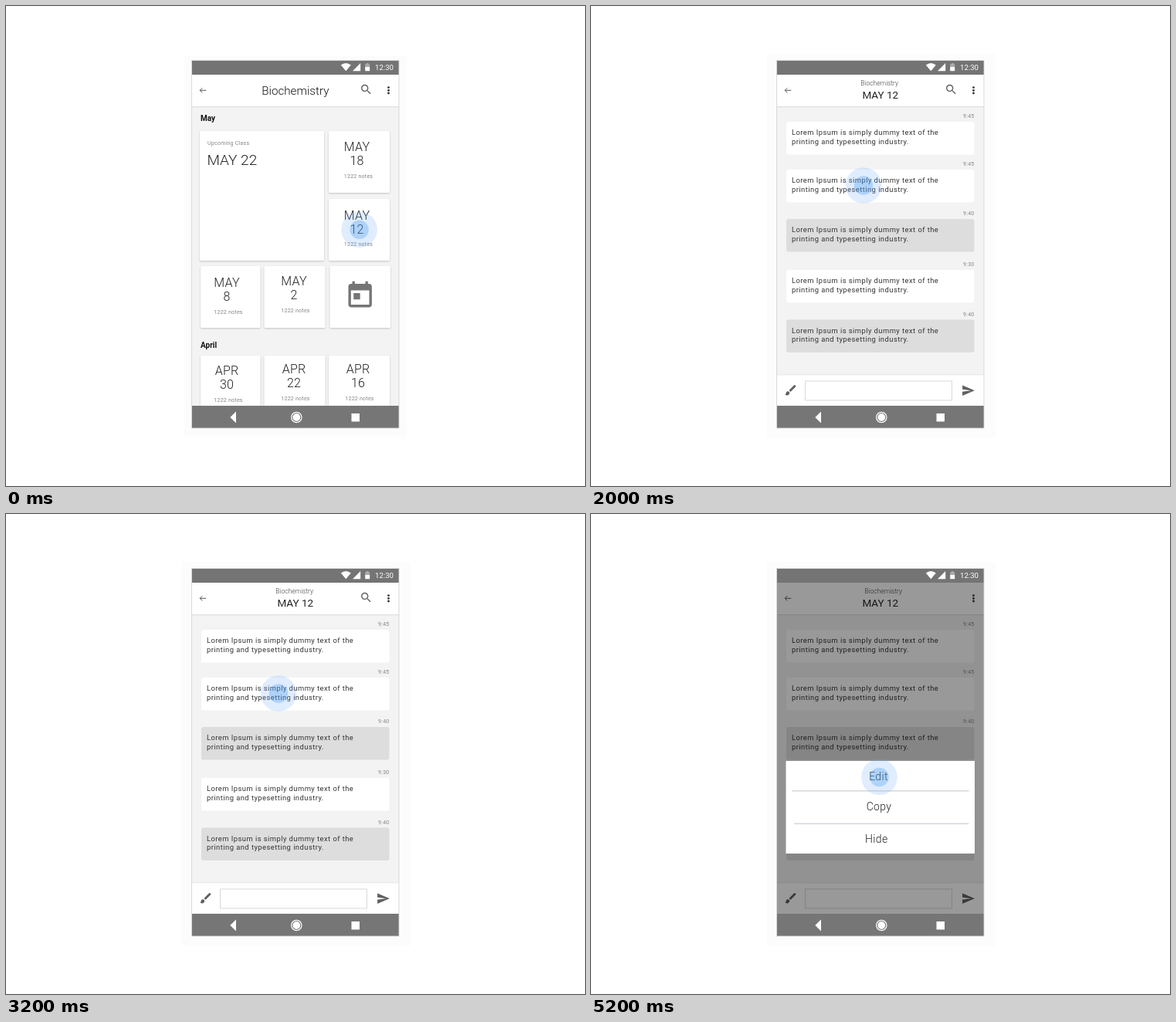
Animation of 750 by 622 pixels, one loop 6 s. Source, as an HTML page:

```html
<!DOCTYPE html>
<html lang="en">
<head>
<meta charset="utf-8">
<title>Class notes prototype</title>
<style>
  html, body { margin: 0; width: 100%; height: 100%; overflow: hidden; background: #fff; }
  svg { display: block; width: 750px; height: 622px; font-family: Roboto, sans-serif; }
  .mid { text-anchor: middle; }
  .end { text-anchor: end; }
  .light { font-weight: 300; }
  .note { font-size: 7px; letter-spacing: .25px; fill: #858585; }
  .date { font-size: 16px; letter-spacing: .15px; font-weight: 300; fill: #222; }
  .head { font-size: 10px; font-weight: 700; fill: #111; }
  .msg { font-size: 9.4px; letter-spacing: .46px; fill: #333; }
  .item { font-size: 14px; letter-spacing: .35px; font-weight: 300; fill: #222; }
  .card { filter: drop-shadow(0 1px 1px rgba(0, 0, 0, .2)); }
</style>
</head>
<body>
<svg id="stage" viewBox="0 0 750 622"></svg>
<script>
const LOOP = 6000, STEP = 2000;

const ICON = {
  search: 'M15.5 14h-.79l-.28-.27C15.41 12.59 16 11.11 16 9.5 16 5.91 13.09 3 9.5 3S3 5.91 3 9.5 5.91 16 9.5 16c1.61 0 3.09-.59 4.23-1.57l.27.28v.79l5 4.99L20.49 19l-4.99-5zm-6 0C7.01 14 5 11.99 5 9.5S7.01 5 9.5 5 14 7.01 14 9.5 11.99 14 9.5 14z',
  today: 'M19 3h-1V1h-2v2H8V1H6v2H5c-1.1 0-2 .9-2 2v14c0 1.1.9 2 2 2h14c1.1 0 2-.9 2-2V5c0-1.1-.9-2-2-2zm0 16H5V8h14v11zM7 10h5v5H7z',
  brush: 'M7 14c-1.66 0-3 1.34-3 3 0 1.31-1.16 2-2 2 .92 1.22 2.49 2 4 2 2.21 0 4-1.79 4-4 0-1.66-1.34-3-3-3zm13.71-9.37l-1.34-1.34c-.39-.39-1.02-.39-1.41 0L9 12.25 11.75 15l8.96-8.96c.39-.39.39-1.02 0-1.41z',
  send: 'M2 21L23 12 2 3v7l15 2-15 2z'
};

const rect = (x, y, w, h, fill, more = '') =>
  `<rect x="${x}" y="${y}" width="${w}" height="${h}" fill="${fill}" ${more}/>`;
const text = (x, y, s, cls, more = '') =>
  `<text x="${x}" y="${y}" class="${cls}" ${more}>${s}</text>`;
const circle = (x, y, r, fill, more = '') =>
  `<circle cx="${x}" cy="${y}" r="${r}" fill="${fill}" ${more}/>`;
const path = (d, fill, more = '') => `<path d="${d}" fill="${fill}" ${more}/>`;
const icon = (name, x, y, k, fill) =>
  path(ICON[name], fill, `transform="translate(${x} ${y}) scale(${k})"`);
const card = (x, y, w, h) => rect(x, y, w, h, '#fff', 'rx="1.5" class="card"');

const ripple = (x, y) =>
  circle(x, y, 23.3, 'rgba(100,165,250,.2)') + circle(x, y, 12.2, 'rgba(64,150,240,.3)');

const backdrop = (x, y, w, h) => rect(x, y, w, h, '#fcfcfc');

function statusBar() {
  return rect(241, 71, 268, 18, '#747474') +
    path('M433.8 76.6Q440.3 71.6 446.8 76.6L440.3 84.2Z', '#fff') +
    path('M459.2 74V84.2H449Z', '#fff') +
    path('M465.2 75.2h1.7V74h2.6v1.2h1.7V79h-6Z', 'rgba(255,255,255,.4)') +
    rect(465.2, 79, 6, 5.2, '#fff') +
    text(502, 83, '12:30', 'end', 'font-size="9.6" fill="#fff"');
}

function navBar() {
  return rect(241, 518, 268, 29, '#767676') +
    path('M290.3 533L298 525.5V540.5Z', '#fff') +
    circle(376.3, 533, 6.7, 'none', 'stroke="#fff" stroke-width="1.2"') +
    circle(376.3, 533, 4.9, '#fff') +
    rect(447.5, 528, 10.5, 10.5, '#fff');
}

function appBar(title, search) {
  return rect(241, 130, 268, 1.2, '#dedede') + rect(241, 89, 268, 41, '#fff') +
    path('M259.3 109.3H251.3M254.3 106.2L251.2 109.3L254.3 112.4', 'none', 'stroke="#444" stroke-width=".9"') +
    (search ? icon('search', 457.9, 99.6, .72, '#666') : '') +
    [105.6, 109.3, 113].map(y => circle(495.5, y, 1.4, '#333')).join('') + title;
}

function dayText([x, y, month, day]) {
  return text(x, y, month, 'mid date') + text(x, y + 18, day, 'mid date') +
    text(x + 2, y + 34.5, '1222 notes', 'mid note');
}

function classList() {
  const cards = [
    [251, 162, 161, 168], [418, 162, 79, 80], [418, 250, 79, 80],
    [252, 337, 77.5, 80], [334.5, 337, 79, 80], [419.5, 337, 78.5, 80],
    [252, 453, 77.5, 80], [334.5, 453, 79, 80], [418, 453, 79, 80]
  ];
  const days = [
    [454.5, 188, 'MAY', 18], [454.5, 276.5, 'MAY', 12],
    [286, 364, 'MAY', 8], [373, 362, 'MAY', 2],
    [286, 478, 'APR', 30], [373, 476, 'APR', 22], [456, 476, 'APR', 16]
  ];
  return rect(241, 89, 268, 429, '#f3f3f3') +
    appBar(text(374.8, 115, 'Biochemistry', 'mid light', 'font-size="15.2" fill="#111"'), true) +
    text(252, 149.3, 'May', 'head') + text(252, 442.5, 'April', 'head') +
    cards.map(c => card(...c)).join('') +
    text(261, 180.3, 'Upcoming Class', 'note') +
    text(260.5, 205.5, 'MAY 22', 'light', 'font-size="19" fill="#222"') +
    days.map(dayText).join('') +
    icon('today', 438.4, 355, 1.69, '#757575');
}

function message([y, time, grey]) {
  return rect(253, y, 243.5, 42.5, grey ? '#ddd' : '#fff', 'rx="3"') +
    text(496.5, y - 4.7, time, 'end note') +
    text(260, y + 17.3, 'Lorem Ipsum is simply dummy text of the', 'msg') +
    text(260, y + 28.9, 'printing and typesetting industry.', 'msg');
}

function chat(labelX, search) {
  const rows = [[150, '9:45'], [212, '9:45'], [276, '9:40', 1], [342, '9:30'], [406.5, '9:40', 1]];
  const title = text(labelX, 102.7, 'Biochemistry', 'mid light', 'font-size="8.5" fill="#444"') +
    text(374.8, 120, 'MAY 12', 'mid', 'font-size="13.5" fill="#222"');
  return rect(241, 89, 268, 429, '#f3f3f3') + appBar(title, search) +
    rows.map(message).join('') +
    rect(241, 477.5, 268, 1, '#e4e4e4') + rect(241, 478.5, 268, 39.5, '#fff') +
    rect(277.5, 486, 190, 25, '#fff', 'stroke="#d9d9d9"') +
    icon('brush', 249.7, 488.8, .75, '#606060') + icon('send', 479.6, 489.3, .75, '#606060');
}

function menu() {
  return rect(241, 89, 268, 429, 'rgba(0,0,0,.4)') +
    rect(252.5, 320, 244.5, 120, '#fff') +
    rect(260.5, 358, 229, 1.6, '#d6d9dd') + rect(263, 400.5, 226.5, 1.6, '#d6d9dd') +
    text(372.5, 344.7, 'Edit', 'mid item') + text(373, 384, 'Copy', 'mid item') +
    text(369.8, 426, 'Hide', 'mid item');
}

const screens = [
  backdrop(231, 64, 288, 494) + classList() + ripple(457.6, 289.8),
  backdrop(228, 62, 296, 498) + chat(373.7, true) + ripple(353, 232.5),
  backdrop(228, 62, 296, 498) + chat(378.7, false) + menu() + ripple(373.5, 341)
];

const stage = document.getElementById('stage');
stage.innerHTML = screens.map(s => `<g>${s}</g>`).join('') + statusBar() + navBar() +
  rect(240.5, 70.5, 268.5, 476.5, 'none', 'stroke="#cfcfcf" stroke-width=".8"');
const groups = [...stage.children].slice(0, screens.length);

function draw(ms) {
  const now = Math.floor((ms % LOOP) / STEP);
  groups.forEach((g, i) => g.setAttribute('display', i === now ? 'inline' : 'none'));
}

const start = performance.now();
function tick() {
  draw(performance.now() - start);
  requestAnimationFrame(tick);
}
tick();
</script>
</body>
</html>
```
